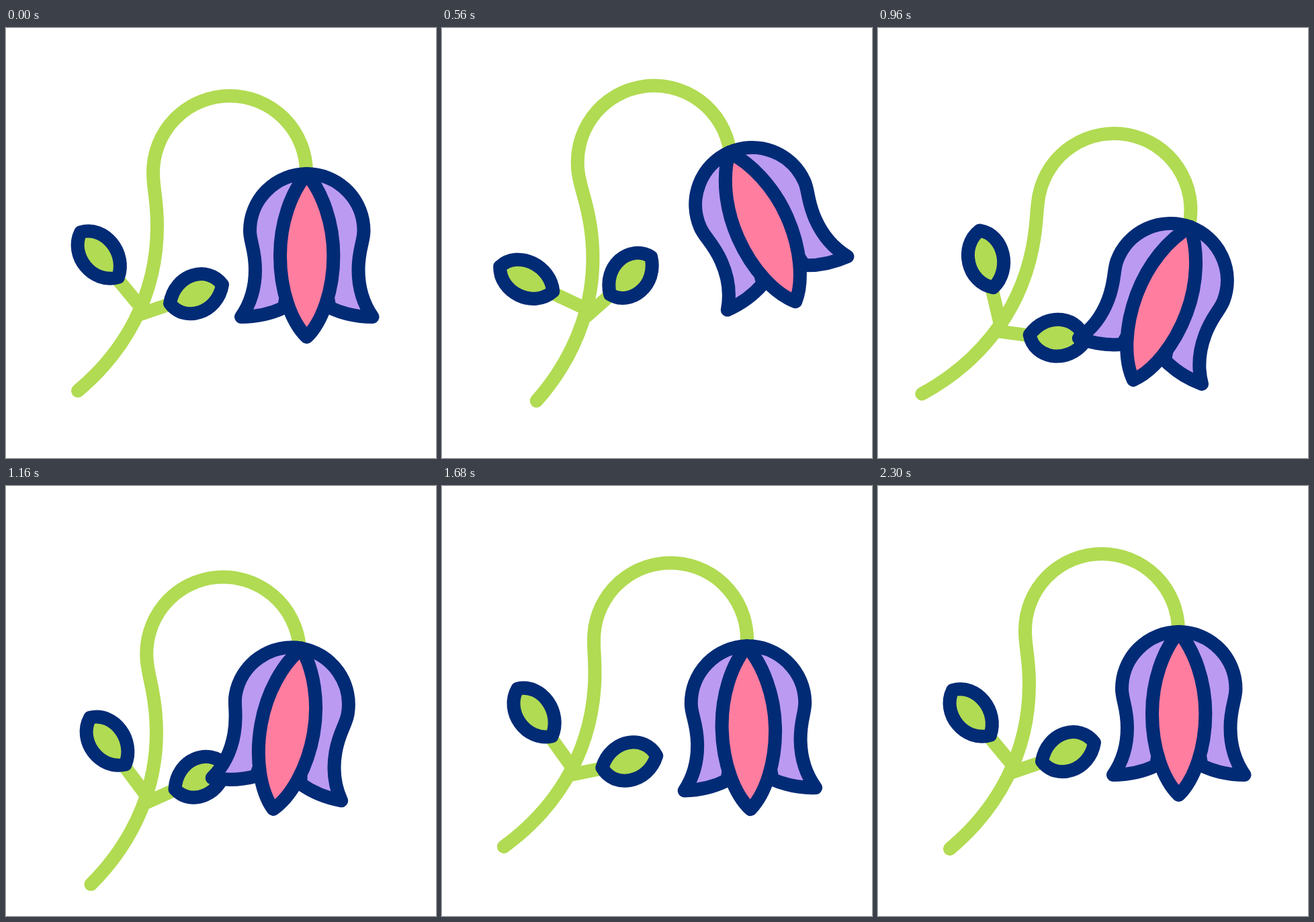
Animation, 640 px wide and 640 px high, one loop 2.4 s. Source, as an HTML page:

```html
<!DOCTYPE html>
<html lang="en">
<head>
<meta charset="utf-8">
<title>Swaying bellflower</title>
<style>
  html, body { margin: 0; width: 100%; height: 100%; overflow: hidden; background: #fff; }
  svg { display: block; width: 100%; height: 100%; }
  path { stroke-width: 20; stroke-linecap: round; stroke-linejoin: round; stroke: #022b76; }
  .stem { fill: none; stroke: #b1db52; }
  .leaf { fill: #b1db52; }
  .side { fill: #bb9af2; }
  .middle { fill: #ff7d9f; }
</style>
</head>
<body>
<svg viewBox="0 0 640 640">
  <g id="plant">
    <path class="stem" d="M107 540C175 483 225 400 225 295C225 255 219 240 219 215A114 114 0 0 1 447 215"/>
    <g id="leftLeaf">
      <path class="stem" d="M201 416L167 375"/>
      <path class="leaf" d="M111 304C147 293 180 335 167 371C129 382 94 339 111 304Z"/>
    </g>
    <g id="rightLeaf">
      <path class="stem" d="M200 426L244 411"/>
      <path class="leaf" d="M244 410C251 366 300 352 322 382C315 425 265 439 244 410Z"/>
    </g>
    <g id="head">
      <path id="petal" class="side" d="M448 217A85 85 0 0 0 363 302C363 318 371 330 371 360C371 385 364 410 350 430C375 430 395 425 414 416Z"/>
      <use href="#petal" transform="translate(895.5) scale(-1 1)"/>
      <path class="middle" d="M447.7 217C424 245 408 290 408 339C408 390 424 437 447.7 460C471 437 487.4 390 487.4 339C487.4 290 471 245 447.7 217Z"/>
    </g>
  </g>
</svg>
<script>
const LOOP = 2400;
const SETTLED = 2300;

// Successive extremes of the bounce (px) and of the shared swing (degrees).
const BOUNCE = [59, -40, 54, -22, 14];
const SWING = [-17.5, 16.5, -8.5, 4];

const smooth = u => u * u * (3 - 2 * u);

// Eases from rest through each extreme, one per half period, and back to rest.
function oscillate(time, extremes, delay, half) {
  if (time < delay || time >= SETTLED) return 0;
  const step = Math.floor((time - delay) / half);
  const from = delay + step * half;
  const to = Math.min(from + half, SETTLED);
  const a = extremes[step - 1] ?? 0;
  const b = extremes[step] ?? 0;
  return a + (b - a) * smooth((time - from) / (to - from));
}

const swing = (time, delay, half = 420) => oscillate(time, SWING, delay, half);

function place(id, angle, pivot, drop = 0) {
  document.getElementById(id)
    .setAttribute("transform", `translate(0 ${drop}) rotate(${angle} ${pivot})`);
}

// The attached parts repeat the stem's swing, each a little later.
function render(time) {
  place("plant", swing(time, 0), "204 321", oscillate(time, BOUNCE, 5, 360));
  place("rightLeaf", swing(time, 60), "200 426");
  place("leftLeaf", 0.95 * swing(time, 160), "201 416");
  place("head", swing(time, 215, 440), "447.5 225");
}

const start = performance.now();
function tick() {
  render((performance.now() - start) % LOOP);
  requestAnimationFrame(tick);
}
tick();
</script>
</body>
</html>
```
